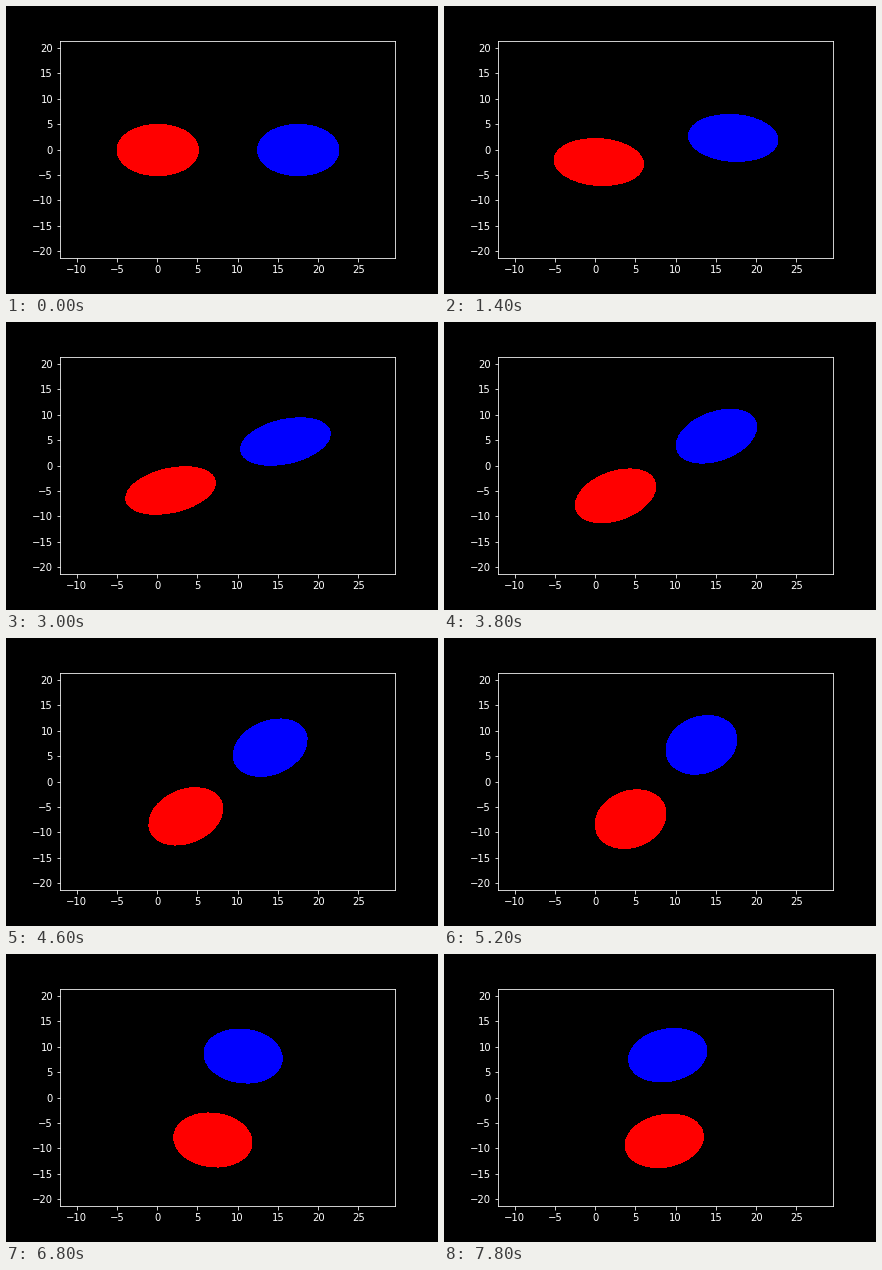
A matplotlib script that plays this animation: 432 px wide and 288 px high, repeating every 8 s.

```python
import numpy as np
import matplotlib.pyplot as plt
from matplotlib.animation import FuncAnimation
from matplotlib.patches import Ellipse

W, H, DPI = 432, 288, 72
STEP = 200
FRAMES = 40
MIDDLE = 8.8 - 0.09j   # common centre of the two orbits
ORBIT_RATE = 11.35     # degrees per second
TIDE = 4.8             # mean tidal stretch of the squared radius


def orbit(t):
    """Offset from the middle and orbital phase after t seconds."""
    phase = np.radians(ORBIT_RATE * t)
    return (8.72 - 0.035 * t) * np.exp(1j * phase), phase


def stretch(t, phase):
    """Complex stretch: its size is the strength, half its angle the axis.

    It circles around a mean that points at the other body.
    """
    swing = 6 * t * np.cos(2 * np.pi * (t - 3.2) / 5.4)
    turn = np.radians(50 * t + swing)
    return TIDE * (1 - np.exp(1j * turn)) * np.exp(2j * phase)


def place(body, center, size, pull):
    body.set_center((center.real, center.imag))
    body.set_width(2 * np.sqrt(size + abs(pull)))
    body.set_height(2 * np.sqrt(size - abs(pull)))
    body.set_angle(np.degrees(np.angle(pull)) / 2)


plt.style.use("dark_background")
plt.rcParams.update({"font.family": "DejaVu Sans", "font.size": 10})
fig = plt.figure(figsize=(W / DPI, H / DPI), dpi=DPI)
ax = fig.add_axes([0.125, 0.125, 0.775, 0.755])


def add_body(color):
    return ax.add_patch(Ellipse((0, 0), 1, 1, facecolor=color,
                                edgecolor="none", linewidth=0,
                                antialiased=False))


red, blue = add_body("#ff0000"), add_body("#0000ff")
ax.set_xlim(-12.07, 29.52)
ax.set_ylim(-21.365, 21.475)
ax.set_xticks(range(-10, 26, 5))
ax.set_yticks(range(-20, 21, 5))


def update(n):
    t = n * STEP / 1000
    offset, phase = orbit(t)
    pull = stretch(t, phase)
    size = 25.6 + 0.9 * np.sin(np.pi * t / 8)
    place(red, MIDDLE - offset, size, pull)
    place(blue, MIDDLE + offset, size, pull)
    return red, blue


anim = FuncAnimation(fig, update, frames=FRAMES, interval=STEP,
                     repeat=True, repeat_delay=0)
plt.show()
```
